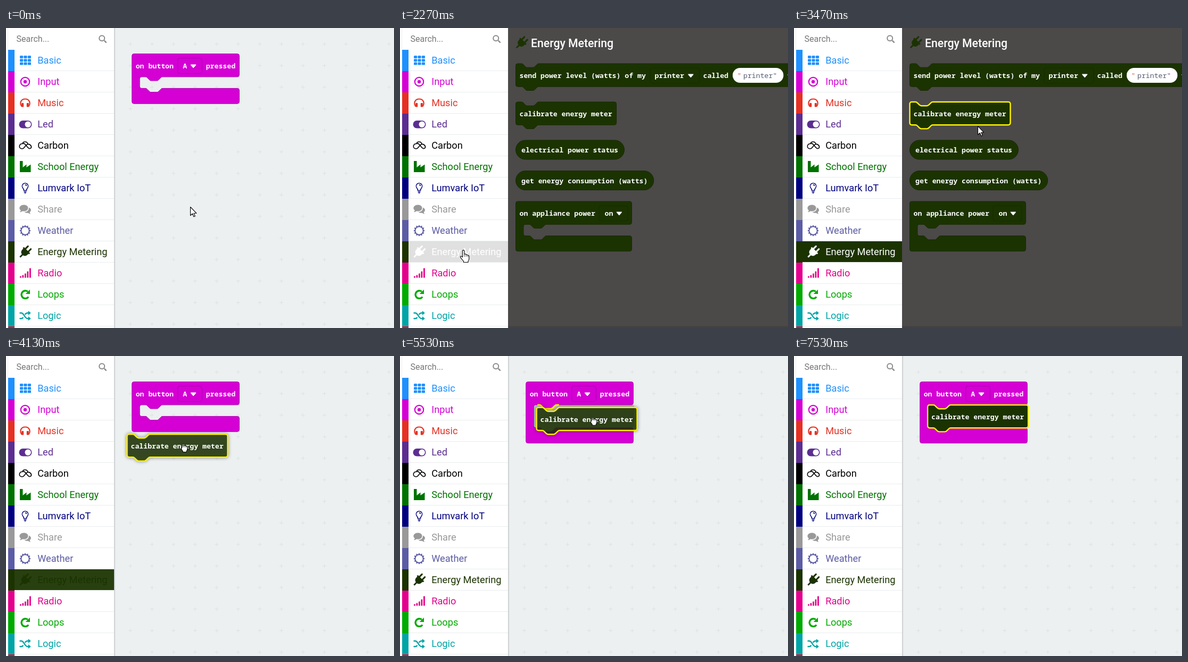
An HTML page that plays this animation: 729x564 px, repeating every 8390 ms.

```html
<!DOCTYPE html>
<html lang="en">
<head>
<meta charset="utf-8">
<title>Block editor</title>
<style>
html, body { margin: 0; width: 100%; height: 100%; overflow: hidden; background: #ecf0f1; }
svg { display: block; width: 729px; height: 564px; }
text { white-space: pre; }
.menu { font: 18.2px Roboto, sans-serif; }
.code { font: 700 13.2px "Noto Sans Mono", monospace; fill: #fff; }
.shape { stroke-width: 1.1; }
.green { fill: #1b3300; stroke: #162a00; }
.pink { fill: #d400d4; stroke: #aa00aa; }
.lit > .shape { stroke: #fff200; stroke-width: 2.7; }
.dragged { filter: drop-shadow(0 0 3px rgba(0, 0, 0, .45)); }
.dragged > .shape { fill-opacity: .8; }
.icon { fill: currentColor; stroke: none; }
.line { fill: none; stroke: currentColor; }
.cursor { fill: #fff; stroke: #000; stroke-width: 1.1; stroke-linejoin: round; }
</style>
</head>
<body>
<svg id="stage" viewBox="0 0 729 564"></svg>
<script>
const LOOP = 8390, FPS = 15;
const OPEN = 2266, DRAG = 4066, DROP = 5799, GONE = 7532;
const HOME = [217.5, 139], SLOT = [251.1, 92], GRAB = [325, 167];
const ENERGY = 9;

// Block outlines use editor units, drawn at 90 % zoom.
const notchRight = 'c2,0 3,1 4,2l4,4c1,1 2,2 4,2h12c2,0 3,-1 4,-2l4,-4c1,-1 2,-2 4,-2';
const notchLeft = 'c-2,0 -3,1 -4,2l-4,4c-1,1 -2,2 -4,2h-12c-2,0 -3,-1 -4,-2l-4,-4c-1,-1 -2,-2 -4,-2';
const corner = (x, y, sweep = 1) => `a4,4 0 0 ${sweep} ${x},${y}`;
const statement = w => `M0,4${corner(4, -4)}h8${notchRight}H${w - 4}${corner(4, 4)}v40${corner(-4, 4)}
  H48${notchLeft}H4${corner(-4, -4)}z`;
const wrapper = (w, inner) => `M4,0H${w - 4}${corner(4, 4)}V44${corner(-4, 4)}H64${notchLeft}h-8
  ${corner(-4, 4, 0)}v${inner - 8}${corner(4, 4, 0)}h8${notchRight}H${w - 4}${corner(4, 4)}v24
  ${corner(-4, 4)}H4${corner(-4, -4)}V4${corner(4, -4)}z`;
const pill = w => `M20,0H${w - 20}a20,20 0 0 1 0,40H20a20,20 0 0 1 0,-40z`;

const path = (d, attrs = '') => `<path d="${d}" ${attrs}/>`;
const rect = (x, y, w, h, attrs = '') => `<rect x="${x}" y="${y}" width="${w}" height="${h}" ${attrs}/>`;
const circle = (x, y, r, attrs = '') => `<circle cx="${x}" cy="${y}" r="${r}" ${attrs}/>`;
const group = (x, y, body, attrs = '') => `<g transform="translate(${x} ${y})" ${attrs}>${body}</g>`;
const code = (x, y, s, attrs = '') => `<text class="code" x="${x}" y="${y}" ${attrs}>${s}</text>`;
const shape = (d, color) => path(d, `class="shape ${color}" transform="scale(.9)"`);
const caret = (x, y) => path(`M${x},${y}h8.6q1.6,0 .6,1.3l-4,4.6q-.9,1 -1.8,0l-4,-4.6q-1,-1.3 .6,-1.3z`, 'fill="#fff"');
const dropdown = (x, w, color) => rect(x, 8, w, 29, `rx="4" class="${color}"`);
const line = (d, width = 2) => path(d, `class="line" stroke-width="${width}"`);

const spikes = Array.from({ length: 24 }, (_, i) => {
  const a = i * Math.PI / 12, r = i % 2 ? 8.2 : 10.8;
  return `${(r * Math.cos(a)).toFixed(1)},${(r * Math.sin(a)).toFixed(1)}`;
}).join(' ');

const plug = `<g transform="rotate(45) scale(.98)">${path(
  'M-5.5,-5v-6.5a1.6,1.6 0 0 1 3.2,0v6.5h4.6v-6.5a1.6,1.6 0 0 1 3.2,0v6.5h3v3h-1.5v3a7,7 0 0 1 -5.5,6.5v6.5h-3v-6.5a7,7 0 0 1 -5.5,-6.5v-3h-1.5v-3z')}</g>`;

const icons = {
  grid: Array.from({ length: 9 }, (_, i) => rect(-10 + i % 3 * 7.4, -9 + Math.floor(i / 3) * 6.2, 6.2, 5, 'rx="1.2"')).join(''),
  target: circle(0, 0, 8.2, 'class="line" stroke-width="2.2"') + circle(0, 0, 3.2),
  phones: line('M-6.5,6.5C-11,0 -8,-7.5 0,-7.5S11,0 6.5,6.5', 2.2) + rect(-6.8, 0, 4, 7.4, 'rx="1.2"') + rect(2.8, 0, 4, 7.4, 'rx="1.2"'),
  toggle: rect(-11.5, -7, 24, 14.5, 'rx="7.25"') + circle(5.2, .2, 5.7, 'fill="#fff"'),
  cloud: line('M9,5.8C3,5.8 1,-6.5 -4.5,-3.5C-12,-4.5 -13,6 -6,6C-1,6 0,-1 4,-2.2C9,-4 13,1.5 11,4.5Q10,5.8 7.5,5.8M-5,-3.5C-4,-8 4,-8.5 5,-2.5', 1.6),
  factory: path('M-10,10v-21h5.5v12l7,-5.5v5.5l8,-5.5v14.5z'),
  bulb: line('M-2.5,4.5Q-2.5,2 -4.4,-.3A5.6,5.6 0 1 1 4.4,-.3Q2.5,2 2.5,4.5zM-2.5,7h5M-1.5,9.2h3M0,-6.3q2.4,0 2.6,2.2', 1.5),
  chat: path('M-2.5,-8.5c5,0 8,2.6 8,6s-3.2,6 -8,6q-1.5,0 -2.6,-.3q-2.4,2 -5,2q1.8,-1.6 1.8,-3.4c-5,-4 -1.5,-10.3 5.8,-10.3zM7,-3.4c5,2.3 5,6.4 1.6,8.8q.4,1.8 1.9,3.2q-2.8,0 -5.2,-2q-4,.6 -7,-1.5c6,0 9,-4 8.7,-8.5z'),
  sun: `<polygon points="${spikes}"/>` + circle(0, 0, 6.7, 'fill="#fff"'),
  plug,
  bars: [3, 5, 8, 12, 18].map((h, i) => rect(-10 + i * 4.5, 8.5 - h, 2.8, h, 'rx=".5"')).join(''),
  redo: line('M6.2,4.6A7.3,7.3 0 1 1 4.8,-5.6', 3.4) + path('M9,-9.3v8.3h-8.3z'),
  shuffle: line('M-10.5,-5.2h3c6,0 6,10.4 12,10.4h2M-10.5,5.2h3q2.5,0 4,-2.2M-.2,-2.2q1.8,-3 4.7,-3h2', 2.5)
    + path('M5.8,-9.3l5,4.1l-5,4.1zM5.8,1.1l5,4.1l-5,4.1z')
};

const rows = [
  ['Basic', '#1e90ff', 'grid'], ['Input', '#d400d4', 'target'], ['Music', '#e63022', 'phones'],
  ['Led', '#5c2d91', 'toggle'], ['Carbon', '#000', 'cloud'], ['School Energy', '#007200', 'factory'],
  ['Lumvark IoT', '#00007f', 'bulb'], ['Share', '#999', 'chat'], ['Weather', '#5c5ca5', 'sun'],
  ['Energy Metering', '#1b3300', 'plug'], ['Radio', '#e3008c', 'bars'], ['Loops', '#00aa00', 'redo'],
  ['Logic', '#00a4a6', 'shuffle']
];

const menuRow = ([label, color, icon], i) => group(0, 41 + 40 * i,
  rect(16, 0, 187, 39, `id="back${i}" fill="#fff"`) + rect(16, 39, 187, 1, 'fill="#e9edee"')
  + rect(4, 0, 12, 40, `fill="${color}"`)
  + `<g id="row${i}" color="${color}">${group(36, 20, icons[icon], 'class="icon"')}
     <text class="menu" x="59.2" y="26" fill="currentColor">${label}</text></g>`);

const sidebar = rect(203, 0, 1.4, 564, 'fill="#c3c7c8"') + rect(204.4, 0, 1.2, 564, 'fill="#dde1e2"')
  + rect(0, 0, 203, 564, 'fill="#fff"') + rect(3, 0, 1, 41, 'fill="#eee"')
  + `<text x="19.5" y="26" font-family="Roboto, sans-serif" font-size="16" fill="#777">Search...</text>`
  + group(181, 20, line('M3.6,3.6L7.6,7.6', 2.4) + circle(-.8, -.8, 5, 'class="line" stroke-width="2"'), 'color="#8a8a8a"')
  + rows.map(menuRow).join('') + rect(4, 561, 12, 3, 'fill="#dc143c"');

const calibrate = shape(statement(210), 'green') + code(7, 27, 'calibrate energy meter');

// Flyout blocks: x, y, width, height, contents.
const flyoutBlocks = [
  [217.5, 67, 520, 43, shape(statement(590), 'green') + code(7, 27, 'send power level (watts) of my')
    + dropdown(252.5, 93, 'green') + code(261, 27, 'printer') + caret(324.5, 19.5) + code(352, 27, 'called')
    + rect(407.5, 8, 95.5, 28, 'rx="14" fill="#fff"') + code(416, 27, '"', 'style="fill:#e05555;font-weight:400"')
    + code(427.5, 27, 'printer', 'style="fill:#575e75;font-weight:500"')
    + code(483, 27, '"', 'style="fill:#575e75;font-weight:400"') + code(510, 27, 'to')],
  [...HOME, 189, 43, calibrate],
  [217.5, 211, 204, 36, shape(pill(226.6), 'green') + code(10.5, 23, 'electrical power status')],
  [217.5, 268.6, 259, 36, shape(pill(288), 'green') + code(10.5, 23, 'get energy consumption (watts)')],
  [217.5, 326, 218, 93, shape(wrapper(242, 24), 'green') + code(7, 27, 'on appliance power')
    + dropdown(156.5, 54, 'green') + code(167, 27, 'on') + caret(190, 19.5)]
];

const flyout = rect(203, 0, 526, 564, 'fill="#4c4949"') + rect(203, 560.5, 526, 3.5, 'fill="#434040"')
  + group(228.5, 27.5, plug, 'fill="#1b3300"')
  + `<text x="246" y="35.5" font-family="Roboto, sans-serif" font-weight="500" font-size="21.2" fill="#fff">Energy Metering</text>`
  + flyoutBlocks.map(([x, y, , , body], i) => group(x, y, body, `id="option${i}"`)).join('');

const eventBlock = shape(wrapper(224, 24), 'pink').replace('<path', '<path id="event"')
  + code(7, 27, 'on button') + dropdown(86, 45.5, 'pink') + code(95.5, 27, 'A') + caret(111, 20) + code(139, 27, 'pressed');

const marker = `<g transform="scale(.9)">${path(statement(210), 'fill="#000" fill-opacity=".2"')}
  ${path(`M8,0h4${notchRight}h5`, 'fill="none" stroke="#fff200" stroke-width="3.4"')}</g>`;

const cursors = {
  arrow: path('M0.5,0.5V16.5L4.3,13L6.8,18.8L9.2,17.8L6.8,12.2H11.8Z'),
  pointer: path('M-1.6,11.5V1.3a1.7,1.7 0 0 1 3.4,0V7.3q3,-1 3.4,1q2.8,-.8 3.2,1.2q2.3,-.4 2.3,2V15.5q0,3 -1.8,5V22.5H.5V20.5L-5,13.8q-1.3,-2.2 .3,-2.8q1.4,-.4 3.1,1.8z')
    + path('M1.8,7.5v4.5M5.2,8.5v3.5M8.4,9.7v2.6', 'fill="none" stroke-width=".8"'),
  fist: path('M-4,-4.6q1.5,-1.7 2.8,-.4q1.3,-1.5 2.6,0q1.6,-1.2 2.4,.5q2.2,-.4 2,1.8V1q0,2.2 -1.6,3.7V6.5H-2.8V5L-5.3,1.2q-1,-2.4 .9,-2.6z')
    + path('M-1.2,-4.4v2.2M1.4,-4.4v2.2M3.8,-4v2', 'fill="none" stroke-width=".7"'),
  grab: path('M-3.5,1L-4.6,-4q.4,-2 2.2,-.8l.6,1.5V-6.5q1.2,-1.7 2.5,0q1.4,-1.6 2.6,.3v1q1.7,-1.2 2.3,.6V1.5q0,2 -1.4,4V8H-2.6V6.4L-6.5,1.6q-.4,-2.2 1.4,-1.8z')
};

document.getElementById('stage').innerHTML = `
  <defs><pattern id="grid" x="213.6" y="10" width="40.5" height="40.5" patternUnits="userSpaceOnUse">
    <path d="M16.7,20.2h7M20.2,16.7v7" stroke="#dde1e2" stroke-width="1"/></pattern></defs>
  ${rect(0, 0, 729, 564, 'fill="#ecf0f1"')}${rect(204, 0, 525, 564, 'fill="url(#grid)"')}
  ${group(236.7, 48.6, eventBlock)}${group(...SLOT, marker, 'id="marker"')}
  ${sidebar}<g id="block">${calibrate}</g><g id="flyout">${flyout}</g>
  <g id="cursor" class="cursor">${Object.entries(cursors).map(([k, d]) => `<g id="${k}">${d}</g>`).join('')}</g>`;

const $ = id => document.getElementById(id);
const show = (id, on) => $(id).setAttribute('visibility', on ? 'inherit' : 'hidden');
const move = (id, x, y) => $(id).setAttribute('transform', `translate(${x} ${y})`);

const linear = p => p;
const smooth = p => p * p * (3 - 2 * p);
const easeIn = p => p ** 1.5;
const easeOut = p => 1 - (1 - p) ** 1.6;
const jump = p => p < 1 ? 0 : 1;

// Pointer route: time, x, y, easing into the point.
const route = [
  [0, 346, 336], [933, 346, 336, linear], [1800, 119, 418, smooth], [2333, 119, 418, linear],
  [3067, 338, 318, easeIn], [3467, 345, 184, linear], [3733, 325, 167, easeOut], [3867, 325, 167, linear],
  [4133, 335, 175, smooth], [4800, 347, 148.6, smooth], [5533, 364, 124.8, smooth], [6200, 364, 124.8, linear],
  [6600, 370, 185, easeIn], [7133, 343, 312, easeOut], [7466, 276, 440, jump], [LOOP, 276, 440, linear]
];

function pointerAt(t) {
  const i = route.findIndex((k, n) => n && t < k[0]);
  const [t0, x0, y0] = route[i - 1], [t1, x1, y1, ease] = route[i];
  const p = ease((t - t0) / (t1 - t0));
  return [x0 + (x1 - x0) * p, y0 + (y1 - y0) * p];
}

const inside = (x, y, [bx, by, w, h], pad = 0) => x >= bx && x <= bx + w && y >= by && y <= by + h + pad;
const mix = (from, to, p) => `rgb(${from.map((v, i) => Math.round(v + (to[i] - v) * p))})`;
const fade = (t, start, ms) => {
  const p = Math.min(1, Math.max(0, (t - start) / ms));
  return 1 - (1 - smooth(p)) ** 1.5;
};

function render(t) {
  const [x, y] = pointerAt(t);
  const open = t >= OPEN && t < DRAG, dragging = t >= DRAG && t < DROP, dropped = t >= DROP;
  const [bx, by] = dropped ? SLOT : [x - GRAB[0] + HOME[0], y - GRAB[1] + HOME[1]];
  const near = dragging && Math.hypot(bx - SLOT[0], by - SLOT[1]) < 43;

  show('flyout', open);
  flyoutBlocks.forEach((b, i) => $('option' + i).setAttribute('class', open && inside(x, y, b, 6) ? 'lit' : ''));

  show('block', dragging || dropped);
  $('block').setAttribute('class', dragging ? 'lit dragged' : 'lit');
  move('block', bx, by);
  show('marker', near);
  $('event').setAttribute('d', wrapper(224, near || dropped ? 48 : 24));

  const dark = [27, 51, 0], white = [255, 255, 255];
  const back = open ? mix([224, 224, 224], dark, fade(t, OPEN, 800))
    : dragging ? mix(dark, white, fade(t, DRAG - 40, 900)) : '#fff';
  $('back' + ENERGY).setAttribute('fill', back);
  $('row' + ENERGY).setAttribute('color', open ? '#fff' : rows[ENERGY][1]);

  const onBlock = open ? flyoutBlocks.some(b => inside(x, y, b)) : dropped && inside(x, y, [...SLOT, 189, 43]);
  const kind = dragging ? 'fist' : x < 203 ? 'pointer' : onBlock ? 'grab' : 'arrow';
  show('cursor', t < GONE);
  for (const k in cursors) show(k, k === kind && t < GONE);
  move('cursor', x, y - (dragging ? 1 : 0));
}

const begin = performance.now();
function tick() {
  const t = (performance.now() - begin) % LOOP;
  render(Math.floor((t + 4) * FPS / 1000) * 1000 / FPS);
  requestAnimationFrame(tick);
}
render(0);
requestAnimationFrame(tick);
</script>
</body>
</html>
```
